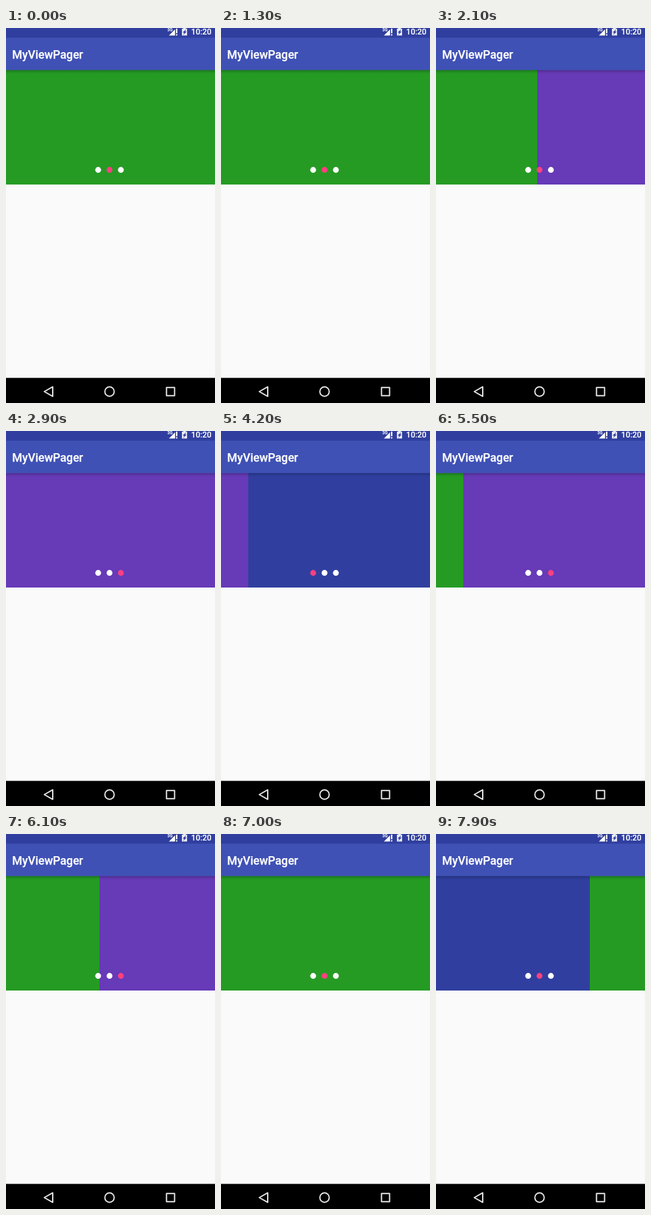
Animation, 322 px wide and 575 px high, one loop 8000 ms. Source, as an HTML page:

```html
<!DOCTYPE html>
<html lang="en">
<head>
<meta charset="utf-8">
<title>MyViewPager</title>
<style>
  html, body { margin: 0; width: 100%; height: 100%; overflow: hidden; background: #fafafa; }
  svg { display: block; font-family: Roboto, sans-serif; font-weight: 500; }
</style>
</head>
<body>
<svg width="322" height="575" viewBox="0 0 322 575" fill="#fff">
  <defs>
    <linearGradient id="shade" x2="0" y2="1">
      <stop offset="0" stop-opacity=".26"/>
      <stop offset=".5" stop-opacity=".08"/>
      <stop offset="1" stop-opacity="0"/>
    </linearGradient>
  </defs>

  <g id="strip"></g>
  <g id="dots"></g>

  <rect y="64.5" width="322" height="6" fill="url(#shade)"/>
  <rect width="322" height="64.5" fill="#3f51b5"/>
  <rect width="322" height="14.8" fill="#303f9f"/>
  <rect y="536.5" width="322" height="38.5" fill="#000"/>

  <text x="9.6" y="47" font-size="17.7" stroke="#fff" stroke-width=".25">MyViewPager</text>
  <text x="285.2" y="10" font-size="12.4" stroke="#fff" stroke-width=".15">10:20</text>
  <text x="248.5" y="5" font-size="6.5" font-weight="700">3G</text>
  <path d="M251 11.5 L260.5 2 V11.5 Z M262 1 h2 v7 h-2 Z M262 9.5 h2 v2 h-2 Z"/>
  <path d="M271 1 h2 v-1 h4 v1 h2 v10.5 h-8 Z" fill="#e8eaf6"/>
  <path d="M277.5 2 L272 7 H274.5 L273 10.5 L278.5 5.5 H276 Z" fill="#303f9f"/>

  <g fill="none" stroke="#e4e4e4" stroke-width="2" stroke-linejoin="round">
    <path d="M59 557.5 L72 550.2 V564.8 Z"/>
    <circle cx="159.5" cy="557.5" r="7.2"/>
    <rect x="247.3" y="551.3" width="12.4" height="12.4"/>
  </g>
</svg>
<script>
  const WIDTH = 322, LOOP = 8000, TICK = 100;
  const BLUE = "#303f9f", GREEN = "#259b24", PURPLE = "#673ab7";

  const add = (parent, tag, attrs) => {
    const el = document.createElementNS("http://www.w3.org/2000/svg", tag);
    for (const name in attrs) el.setAttribute(name, attrs[name]);
    return parent.appendChild(el);
  };

  const strip = document.getElementById("strip");
  [GREEN, PURPLE, BLUE, GREEN, PURPLE].forEach((fill, i) =>
    add(strip, "rect", { x: i * WIDTH, y: 64, width: WIDTH, height: 176, fill }));

  const dots = [0, 1, 2].map(i =>
    add(document.getElementById("dots"), "circle", { cx: 142 + i * 17.5, cy: 217.6, r: 4.5 }));

  const smooth = u => u * u * (3 - 2 * u);
  const settle = u => 1 - (1 - u) ** 5;
  const pull = u => Math.sin(Math.PI * u ** 0.9);

  // A swipe turns whole pages; a tug drags some pixels and springs back.
  const swipe = (at, ms, pages, ease = settle) => ({ at, ms, pages, move: u => pages * ease(u) });
  const tug = (at, ms, px) => ({ at, ms, pages: 0, move: u => px / WIDTH * pull(u) });

  const gestures = [
    tug(800, 600, 149),
    tug(1800, 600, 202),
    swipe(2500, 500, 1, smooth),
    swipe(4200, 300, 1),
    swipe(4800, 200, 1),
    swipe(5500, 300, 1),
    tug(6100, 500, -214),
    swipe(6800, 300, -1),
    tug(7700, 460, -281)
  ];

  function pose(time) {
    let scroll = 0, page = 0;
    for (const { at, ms, pages, move } of gestures) {
      if (time < at) break;
      const u = Math.min(1, (time - at + TICK) / ms);
      scroll = page + move(u);
      page = u < 1 && pages ? Math.round(scroll) : page + pages;
    }
    return { scroll, page };
  }

  function draw(now) {
    const time = Math.floor(now % LOOP / TICK) * TICK;
    const { scroll, page } = pose(time);
    strip.setAttribute("transform", `translate(${-Math.round(scroll * WIDTH)})`);
    dots.forEach((dot, i) => dot.setAttribute("fill", i === (page + 1) % 3 ? "#ff4081" : "#fff"));
  }

  const start = performance.now();
  function frame() {
    draw(performance.now() - start);
    requestAnimationFrame(frame);
  }
  frame();
</script>
</body>
</html>
```
